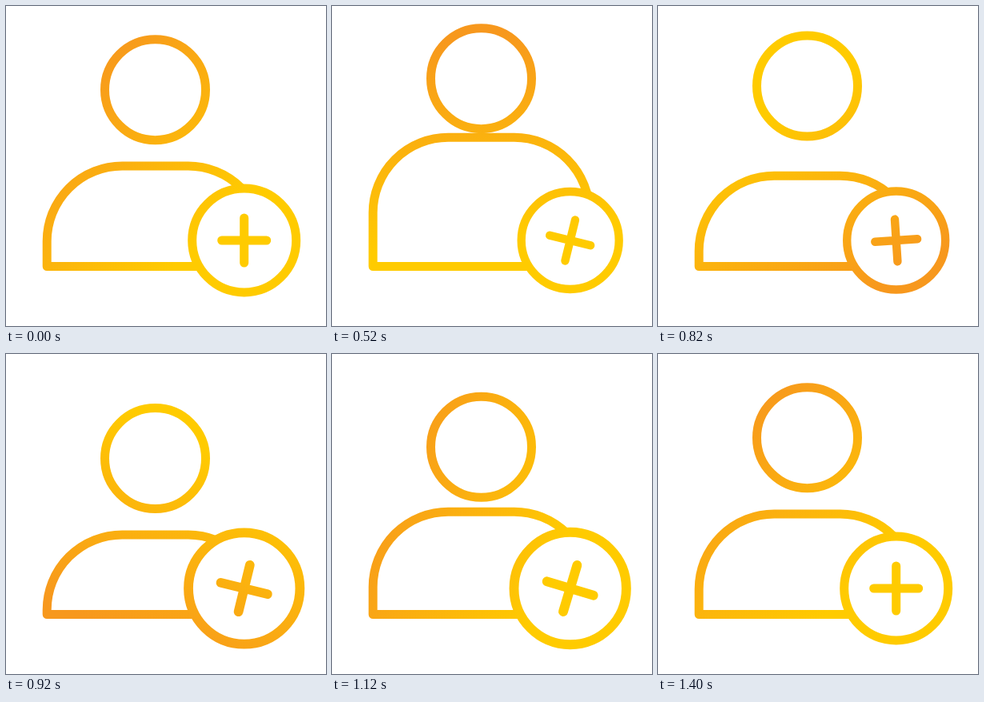
Animation, 400 px wide and 400 px high, one loop 1420 ms. Source, as an HTML page with a canvas:

```html
<!DOCTYPE html>
<html lang="en">
<head>
<meta charset="utf-8">
<title>Add user</title>
<style>
html, body { margin: 0; height: 100%; overflow: hidden; background: #fff; }
canvas { display: block; }
</style>
</head>
<body>
<canvas id="stage" width="400" height="400"></canvas>
<script>
const ctx = document.getElementById('stage').getContext('2d');
const LOOP = 1420, HOLD = 420, LAST_STEP = 39;

// Each track is a list of [step, value]; one step is 25 ms after the hold.
const headY = [[-1, 104.7], [10.4, 70], [22.4, 137], [33.6, 95.5], [39, 104.7]];
const bodyTop = [[-3, 200], [7, 155], [19.7, 226], [31, 191.5], [39, 200]];
const badgeScale = [[-2, 1], [11.3, 0.855], [22.7, 1.105], [39, 1]];
const plusAngle = [[-2, 0], [24, 110], [39, 90]];
const shadeAngle = [[-4, 225], [34, 585]];

function valueAt(track, step) {
  let i = 1;
  while (i < track.length - 1 && step > track[i][0]) i++;
  const [s0, v0] = track[i - 1], [s1, v1] = track[i];
  const u = Math.min(1, (step - s0) / (s1 - s0));
  return v0 + (v1 - v0) * (1 - Math.cos(Math.PI * u)) / 2;
}

// Steps alternate between 30 ms and 20 ms on screen.
function stepAt(ms) {
  if (ms < HOLD) return LAST_STEP;
  const t = ms - HOLD;
  return Math.floor(t / 50) * 2 + (t % 50 >= 30 ? 1 : 0);
}

const radians = deg => deg * Math.PI / 180;

function shade(angle) {
  const dx = Math.cos(angle), dy = Math.sin(angle);
  const g = ctx.createLinearGradient(210 - 90 * dx, 200 - 90 * dy, 210 + 165 * dx, 200 + 165 * dy);
  g.addColorStop(0, '#ffcb00');
  g.addColorStop(1, '#f7981d');
  return g;
}

function circle(x, y, r) {
  ctx.beginPath();
  ctx.arc(x, y, r, 0, 2 * Math.PI);
}

function drawBody(top) {
  const left = 51.2, right = 321.8, bottom = 325.5, r = 94;
  const side = Math.min(top + r, bottom);
  ctx.beginPath();
  ctx.moveTo(left, bottom);
  ctx.lineTo(left, side);
  ctx.ellipse(left + r, side, r, side - top, 0, Math.PI, 1.5 * Math.PI);
  ctx.ellipse(right - r, side, r, side - top, 0, 1.5 * Math.PI, 2 * Math.PI);
  ctx.lineTo(right, bottom);
  ctx.closePath();
  ctx.stroke();
}

function drawBadge(scale, angle) {
  const x = 297.7, y = 293, arm = 28 * scale;
  ctx.lineWidth = 11 * scale;
  circle(x, y, 65 * scale);
  ctx.fill();
  ctx.stroke();
  ctx.beginPath();
  for (const a of [angle, angle + Math.PI / 2]) {
    const dx = arm * Math.cos(a), dy = arm * Math.sin(a);
    ctx.moveTo(x - dx, y - dy);
    ctx.lineTo(x + dx, y + dy);
  }
  ctx.stroke();
}

function draw(now) {
  const step = stepAt(now % LOOP);
  ctx.fillStyle = '#fff';
  ctx.fillRect(0, 0, 400, 400);
  ctx.lineCap = ctx.lineJoin = 'round';
  ctx.lineWidth = 11;
  ctx.strokeStyle = shade(radians(valueAt(shadeAngle, step)));

  circle(186.5, valueAt(headY, step), 63);
  ctx.stroke();
  drawBody(valueAt(bodyTop, step));
  drawBadge(valueAt(badgeScale, step), radians(valueAt(plusAngle, step)));
  requestAnimationFrame(draw);
}
requestAnimationFrame(draw);
</script>
</body>
</html>
```
